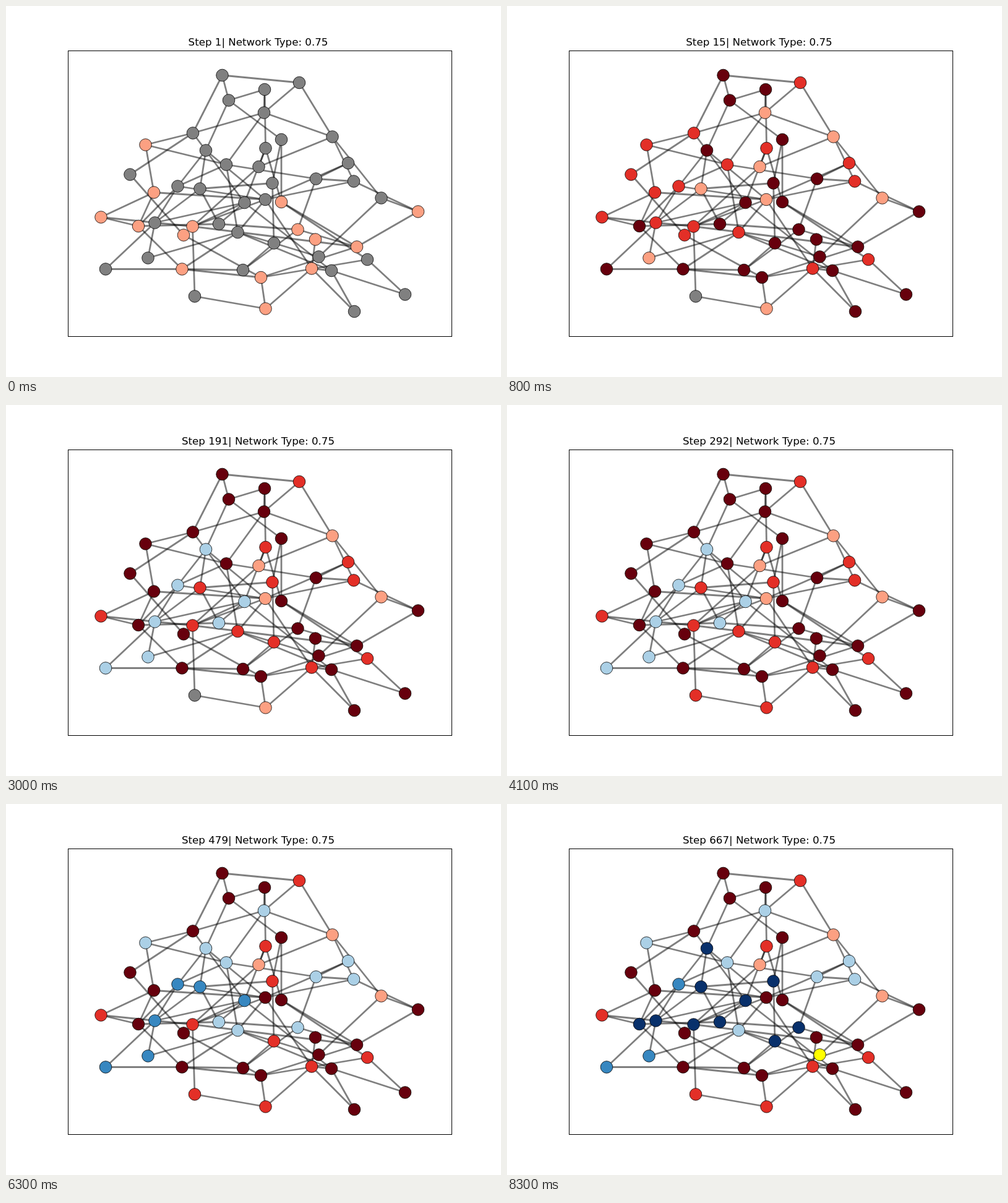
Recreate the animation shown at these times as an HTML page with a canvas. Size 800 px wide and 600 px high, loop 8400 ms.

```html
<!DOCTYPE html>
<html lang="en">
<head>
<meta charset="utf-8">
<title>Network steps</title>
<style>
html, body { margin: 0; width: 100%; height: 100%; overflow: hidden; background: #fff; }
canvas { display: block; }
</style>
</head>
<body>
<canvas id="stage" width="800" height="600"></canvas>
<script>
const ctx = document.getElementById('stage').getContext('2d');

// The graph: position of each node and the later nodes it links to.
const graph = {
  A: [349.5, 112, 'BDF'], B: [474, 124, 'EK'], C: [418, 135, 'DEJ'],
  D: [360, 152.5, 'HI'], E: [417, 172.5, 'FKM'], F: [302, 205.5, 'GOX'],
  G: [225.5, 224.5, 'MU'], H: [323, 233.5, 'STV'], I: [445, 216, 'RW'],
  J: [419.5, 230, 'NXW'], K: [527.5, 211.5, 'NQY'], L: [553, 254, 'PV'],
  M: [356, 256.5, 'SPg'], N: [408.5, 260, 'd'], O: [200.5, 272.5, 'f'],
  P: [501, 279.5, 'Qh'], Q: [562, 283.5, 'VZ'], R: [430.5, 286.5, 'Tj'],
  S: [277.5, 291.5, 'Vbc'], T: [313.5, 295.5, 'ce'], U: [239, 301.5, 'Vab'],
  V: [419, 313, 'dgs'], W: [445, 317, 'kn'], X: [385.5, 318, 'cdet'],
  Y: [606.5, 310.5, 'Zm'], Z: [666, 332.5, 'k'], a: [153.5, 341.5, 'bd'],
  b: [214, 356, 'ep'], c: [240.5, 350.5, 'lo'], d: [301.5, 356.5, 'ku'],
  e: [344, 352.5, 'h'], f: [287, 370.5, 'r'], g: [374.5, 366, 'jtlp'],
  h: [471.5, 361.5, 'kq'], i: [500, 377.5, 's'], j: [433, 383.5, 'mq'],
  k: [567, 389.5, 'r'], l: [229.5, 407.5, ''], m: [505.5, 405.5, ''],
  n: [584, 410, 'rx'], o: [161, 425.5, 'p'], p: [284.5, 425.5, 'qr'],
  q: [383, 427, ''], r: [412, 439, 'v'], s: [494, 424.5, 'tvw'],
  t: [526, 428, 'wx'], u: [305, 469.5, 'v'], v: [419.5, 489.5, ''],
  w: [563, 494, ''], x: [645, 466.5, '']
};

const palette = ['#808080', '#fca082', '#e32f27', '#67000d', '#abd0e6', '#3787c0', '#08306b', '#ffff00'];
const [GREY, SALMON, RED, DARK, LIGHT, BLUE, NAVY, YELLOW] = palette.keys();
const frameCount = 84, phaseLength = 9;
const seeds = 'GUabfdprvshiWkZ';

// New states reached in each successive phase.
const phases = [
  { [SALMON]: 'EKNTVYl', [RED]: 'BFGJLMOQSUacdfgns', [DARK]: 'ACDHIPRWXZbehijkmopqrtwx' },
  { [DARK]: 'GFOEMUf', [LIGHT]: 'HSTXRcelo' },
  {},
  { [RED]: 'TRj' },
  { [RED]: 'uv' },
  { [DARK]: 'VL' },
  { [LIGHT]: 'EGMLPQgh', [BLUE]: 'STXclo' },
  {},
  { [NAVY]: 'HTR' },
  { [NAVY]: 'Xbcdehj', [YELLOW]: 'm' }
];
const stepKeys = [[0, 1], [8, 15], [20, 99], [41, 292], [55, 419], [63, 479], [83, 667]];

function stepAt(frame) {
  const next = Math.max(1, stepKeys.findIndex(key => key[0] >= frame));
  const [f0, s0] = stepKeys[next - 1], [f1, s1] = stepKeys[next];
  return Math.round(s0 + (s1 - s0) * (frame - f0) / (f1 - f0));
}

// Nodes of a group switch one after another; warm shades deepen gradually.
function stateAt(name, frame) {
  let state = seeds.includes(name) ? SALMON : GREY;
  phases.forEach((phase, index) => {
    const start = index * phaseLength;
    for (const [key, group] of Object.entries(phase)) {
      const place = group.indexOf(name);
      if (place < 0 || frame <= start) continue;
      const target = Number(key);
      const due = Math.min(frameCount - 1, start + 2 + place % 7);
      if (frame >= due) state = target;
      else if (target <= DARK)
        state += Math.floor((target - state) * (frame - start) / (due - start));
    }
  });
  return state;
}

function draw(frame) {
  ctx.fillStyle = '#fff';
  ctx.fillRect(0, 0, 800, 600);

  ctx.strokeStyle = 'rgba(0, 0, 0, 0.5)';
  ctx.lineWidth = 2.78;
  for (const [x, y, links] of Object.values(graph)) for (const other of links) {
    ctx.beginPath();
    ctx.moveTo(x, y);
    ctx.lineTo(graph[other][0], graph[other][1]);
    ctx.stroke();
  }

  ctx.strokeStyle = '#000';
  ctx.lineWidth = 0.8;
  for (const [name, [x, y]] of Object.entries(graph)) {
    ctx.fillStyle = palette[stateAt(name, frame)];
    ctx.beginPath();
    ctx.arc(x, y, 9.8, 0, 2 * Math.PI);
    ctx.fill();
    ctx.stroke();
  }

  ctx.lineWidth = 1;
  ctx.strokeRect(100.5, 72.5, 620, 462);
  ctx.fillStyle = '#000';
  ctx.font = '16.67px "DejaVu Sans", sans-serif';
  ctx.textAlign = 'center';
  ctx.fillText(`Step ${stepAt(frame)}| Network Type: 0.75`, 407.5, 64);
}

let origin;
function tick(now) {
  origin ??= now;
  draw(Math.floor((now - origin) / 100) % frameCount);
  requestAnimationFrame(tick);
}
draw(0);
requestAnimationFrame(tick);
</script>
</body>
</html>
```
